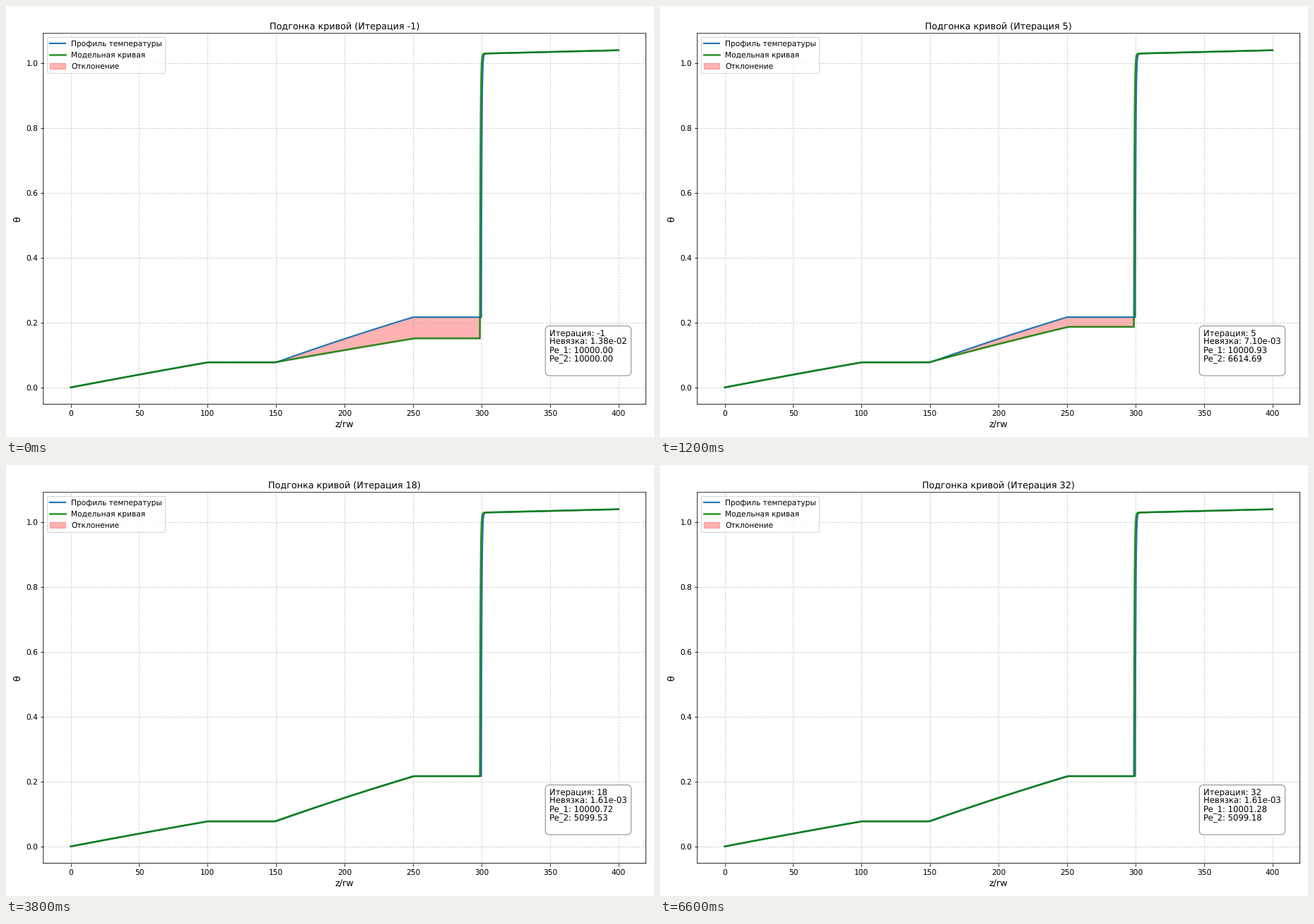
Animation of 917x611 px, one loop 7000 ms. Source, as a matplotlib script:

```python
import numpy as np
import matplotlib.pyplot as plt
from matplotlib.animation import FuncAnimation

DPI = 76.375
W, H = 917, 611
FRAMES, INTERVAL = 35, 200
LAST_ITER = 32

# Accepted or tried points of the fit: first iteration, Pe_1, Pe_2, residual
POINTS = [
    (-1, 10000.00, 10000.00, 1.38e-2),
    (4, 10000.88, 6614.69, 7.10e-3),
    (7, 10001.35, 3650.27, 1.05e-2),
    (8, 10001.04, 4712.36, 2.63e-3),
    (11, 10001.09, 5077.965, 1.65e-3),
    (14, 10000.72, 5099.505, 1.61e-3),
    (19, 10001.28, 5099.18, 1.61e-3),
]
# Iterations that probe the gradient along one parameter
PROBE_1 = {2, 5, 9, 12, 15, 20, 25, 28}
PROBE_2 = {3, 6, 10, 13, 16, 18, 21, 26, 29}
PROBE_STEP = 5e-6

z = np.linspace(0, 400, 2001)


def profile(pe1, pe2, ramp, jump):
    """Two heated intervals, a steep jump and a slow rise."""
    start, end = ramp
    heat = 805 / pe1 * np.clip(z / 100, 0, 1)
    heat = heat + 835 / pe2 * np.clip((z - start) / (end - start), 0, 1)
    base = 1 - np.exp(-heat)
    top = 1.0296 + 0.0102 * (z - 302) / 98
    rise = 1 - np.exp(-2.6 * np.clip(z - jump, 0, None))
    return base + (top - base) * rise


def model_profile(pe1, pe2):
    return profile(pe1, pe2, (149, 251), 298.8)


def fit_state(it):
    _, pe1, pe2, res = [p for p in POINTS if p[0] <= it][-1]
    if it in PROBE_1:
        pe1 *= 1 + PROBE_STEP
    if it in PROBE_2:
        pe2 *= 1 + PROBE_STEP
    return pe1, pe2, res


plt.rcParams["font.family"] = "DejaVu Sans"
plt.rcParams["text.hinting"] = "none"
fig = plt.figure(figsize=(12.00655, 8), dpi=DPI)
left, right, top, bottom = 52.8, 905.5, 38.8, 564.6
ax = fig.add_axes([left / W, 1 - bottom / H,
                   (right - left) / W, (bottom - top) / H])
ax.set_xlim(-20, 420)
ax.set_ylim(-0.052, 1.0918)
ax.set_xlabel("z/rw", fontsize=12)
ax.set_ylabel("θ", fontsize=12)
ax.grid(True, linestyle="--", alpha=0.6)
for spine in ax.spines.values():
    spine.set_snap(False)

measured = profile(10000, 5100, (150, 250), 299.8)
ax.plot(z, measured, color="C0", lw=2, label="Профиль температуры")
model_line, = ax.plot([], [], color="green", lw=2.5, alpha=0.8,
                      label="Модельная кривая")


def fill_gap(model):
    return ax.fill_between(z, measured, model, color="red", alpha=0.3,
                           label="Отклонение")


gap = fill_gap(model_profile(10000, 10000))
ax.legend(loc="upper left", fontsize=10)
title = ax.set_title("", fontsize=12)
info = ax.text(0.84, 0.2, "", transform=ax.transAxes, fontsize=11,
               ha="left", va="top", linespacing=1.0,
               bbox=dict(boxstyle="round,pad=0.5", facecolor="white",
                         edgecolor="gray", alpha=0.9))


def update(frame):
    global gap
    it = min(frame - 1, LAST_ITER)
    pe1, pe2, res = fit_state(it)
    model = model_profile(pe1, pe2)
    model_line.set_data(z, model)
    gap.remove()
    gap = fill_gap(model)
    title.set_text(f"Подгонка кривой (Итерация {it})")
    info.set_text(f"Итерация: {it}\nНевязка: {res:.2e}\n"
                  f"Pe_1: {pe1:.2f}\nPe_2: {pe2:.2f}\n")
    return model_line, gap, title, info


anim = FuncAnimation(fig, update, frames=FRAMES, interval=INTERVAL,
                     init_func=lambda: update(0), repeat=True, repeat_delay=0)
plt.show()
```
